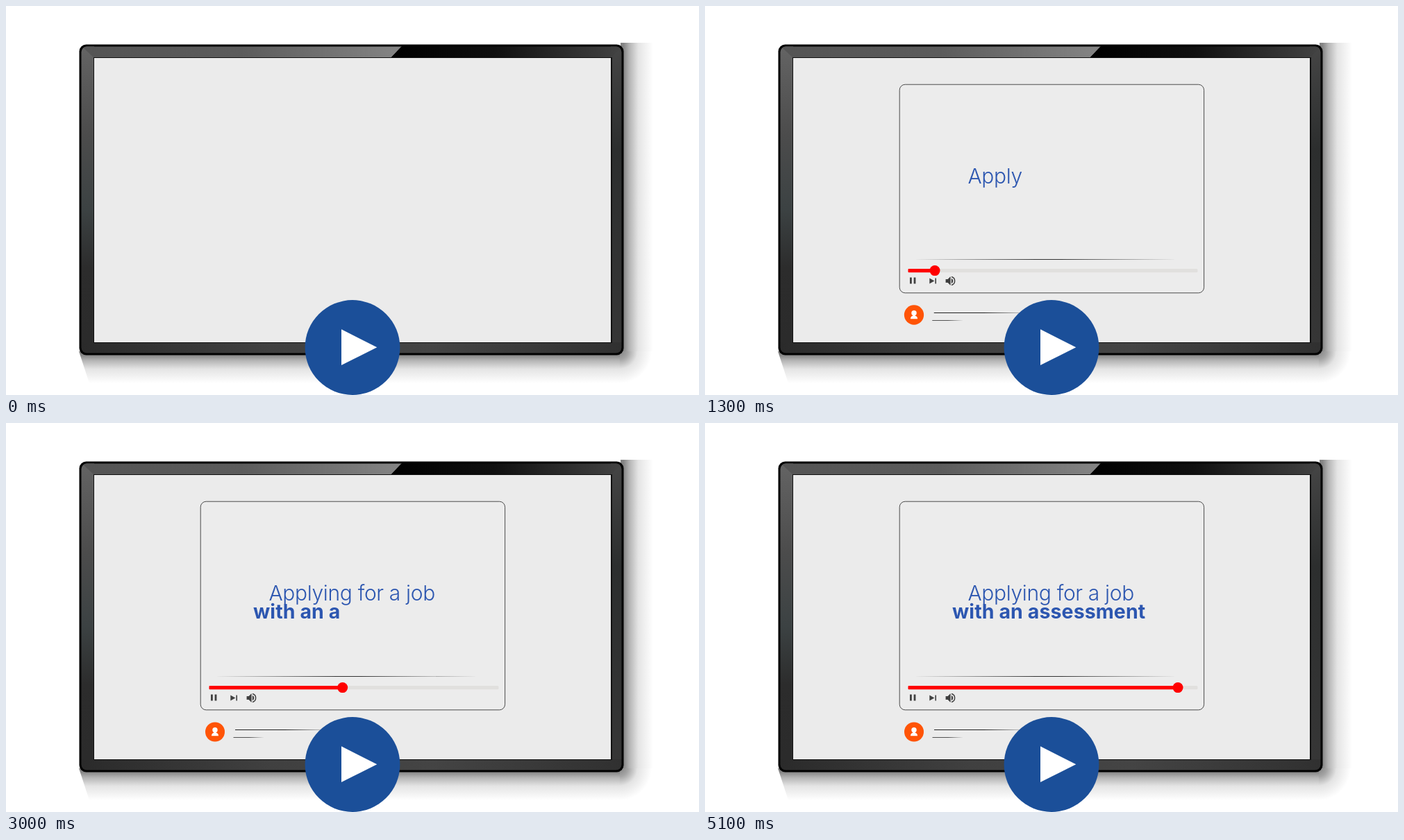
These frames come from a looping animation (998x561 px, 5200 ms). An HTML page:

```html
<!DOCTYPE html>
<html lang="en">
<head>
<meta charset="utf-8">
<title>Video player</title>
<style>
  html, body { margin: 0; width: 100%; height: 100%; overflow: hidden; background: #fff; }
  svg { display: block; width: 100%; height: 100%; }
  text { font-family: Inter, "Open Sans", sans-serif; fill: #2c56b0; white-space: pre; }
</style>
</head>
<body>
<svg viewBox="0 0 998 561">
  <defs>
    <linearGradient id="shadeR" gradientUnits="userSpaceOnUse" x1="889" x2="932" y1="0" y2="0">
      <stop offset="0" stop-color="#838383"/><stop offset=".2" stop-color="#b4b4b4"/>
      <stop offset=".5" stop-color="#e4e4e4"/><stop offset="1" stop-color="#fff"/>
    </linearGradient>
    <linearGradient id="shadeB" gradientUnits="userSpaceOnUse" x1="0" x2="0" y1="503" y2="544">
      <stop offset="0" stop-color="#838383"/><stop offset=".2" stop-color="#b4b4b4"/>
      <stop offset=".5" stop-color="#e4e4e4"/><stop offset="1" stop-color="#fff"/>
    </linearGradient>
    <radialGradient id="shadeC" gradientUnits="userSpaceOnUse" cx="884" cy="498" r="46">
      <stop offset="0" stop-color="#838383"/><stop offset=".25" stop-color="#a4a4a4"/>
      <stop offset=".55" stop-color="#e4e4e4"/><stop offset="1" stop-color="#fff"/>
    </radialGradient>
    <linearGradient id="topL">
      <stop offset="0" stop-color="#545454"/><stop offset=".5" stop-color="#5c5c5c"/><stop offset="1" stop-color="#858585"/>
    </linearGradient>
    <linearGradient id="topR">
      <stop offset="0" stop-color="#000"/><stop offset=".45" stop-color="#101010"/><stop offset="1" stop-color="#444"/>
    </linearGradient>
    <linearGradient id="sideL" x2="0" y2="1">
      <stop offset="0" stop-color="#646464"/><stop offset=".3" stop-color="#4c4c4c"/>
      <stop offset=".55" stop-color="#3c4243"/><stop offset=".75" stop-color="#2c2c2c"/><stop offset="1" stop-color="#2b2b2b"/>
    </linearGradient>
    <linearGradient id="sideR" x2="0" y2="1">
      <stop offset="0" stop-color="#454545"/><stop offset=".35" stop-color="#2c2e2e"/><stop offset="1" stop-color="#363636"/>
    </linearGradient>
    <linearGradient id="foot">
      <stop offset="0" stop-color="#2a2a2a"/><stop offset=".35" stop-color="#404040"/>
      <stop offset=".65" stop-color="#444"/><stop offset="1" stop-color="#303030"/>
    </linearGradient>
    <clipPath id="bezel"><rect x="108.5" y="58.5" width="778" height="442" rx="8"/></clipPath>
  </defs>

  <path d="M885 53H932V498H885Z" fill="url(#shadeR)"/>
  <path d="M105 498L120 544H884V498Z" fill="url(#shadeB)"/>
  <path d="M884 498H932V544H884Z" fill="url(#shadeC)"/>

  <rect x="105.5" y="55.5" width="784" height="448" rx="10"/>
  <g clip-path="url(#bezel)">
    <rect x="106" y="485" width="783" height="18" fill="url(#foot)"/>
    <rect x="106" y="57" width="21" height="428" fill="url(#sideL)"/>
    <rect x="871" y="57" width="18" height="428" fill="url(#sideR)"/>
    <path d="M108 57H571L554 75H127Z" fill="url(#topL)"/>
    <path d="M571 57H889L871 75H554Z" fill="url(#topR)"/>
  </g>
  <rect x="126" y="74" width="747" height="412" fill="#111"/>
  <rect x="127" y="75" width="744" height="410" fill="#ebebeb"/>

  <g id="player">
    <rect x="280.2" y="113.2" width="438.4" height="300.6" rx="8" fill="#ececec" stroke="#3a3a3a" stroke-width=".9"/>
    <path d="M300 365.4L480 365L680 365.4L480 366Z" fill="#333"/>
    <rect x="292.5" y="379" width="417" height="5.2" rx="1.5" fill="#e1e0de"/>
  </g>

  <g id="icons" fill="#404040">
    <path d="M295 391.5h2.8v9h-2.8zM300.6 391.5h2.8v9h-2.8z"/>
    <path d="M323.3 392.6L330.4 396.5L323.3 400.4ZM331.4 392.4h1.6v8.2h-1.6z"/>
    <path d="M346.6 394h3l4-4v13l-4-4h-3z"/>
    <path d="M354.8 392.8a4 4 0 0 1 0 7.4z"/>
    <path d="M355 390.5a6.2 6.2 0 0 1 0 12" fill="none" stroke="#404040" stroke-width="1.5"/>
  </g>

  <g id="played" fill="#f00">
    <rect id="bar" x="292.5" y="379" height="5.2" rx="1"/>
    <circle id="knob" cy="381.6" r="7.5"/>
  </g>

  <g id="notes" fill="#222">
    <path d="M330 442.1H400L470 442.5L400 443H330Z"/>
    <path d="M327.5 453.2H350L372 453.6L350 454H327.5Z"/>
  </g>

  <g id="avatar">
    <circle cx="301" cy="445.5" r="14" fill="#ff5406"/>
    <circle cx="301" cy="442.8" r="3.7" fill="#fff"/>
    <path d="M299.4 445h3.2v1.8q3.4.8 3.4 4.4h-10q0-3.6 3.4-4.4z" fill="#fff"/>
  </g>

  <text id="line1" x="378.5" y="256" font-size="30" font-weight="300" letter-spacing="-.35"></text>
  <text id="line2" x="356" y="281.5" font-size="28.5" font-weight="700" letter-spacing=".1"></text>

  <circle cx="499" cy="492.5" r="68.4" fill="#1b4f99"/>
  <path d="M483 466.3V518L534.3 492.2Z" fill="#fff"/>
</svg>
<script>
  const LOOP = 5200, STEP = 100, TYPE_MS = 83.3;
  const $ = id => document.getElementById(id);

  // Spring-like scale: [ms since start, scale]
  const POP = [[0, 0], [50, .45], [150, .95], [250, 1.075], [350, 1.045],
               [450, 1.02], [550, 1.011], [750, 1.009], [1200, 1]];

  function popScale(ms) {
    if (ms <= 0) return 0;
    for (let i = 1; i < POP.length; i++) {
      const [t0, a] = POP[i - 1], [t1, b] = POP[i];
      if (ms < t1) return a + (b - a) * (ms - t0) / (t1 - t0);
    }
    return 1;
  }

  function pop(id, ms, cx, cy, turn = 0) {
    const s = popScale(ms);
    $(id).setAttribute("transform",
      `translate(${cx} ${cy}) rotate(${turn * (s - 1)}) scale(${s}) translate(${-cx} ${-cy})`);
    $(id).style.display = s ? "" : "none";
  }

  function type(id, words, ms) {
    $(id).textContent = words.slice(0, Math.max(0, Math.floor(ms / TYPE_MS)));
  }

  function draw(t) {
    pop("player", t - 50, 499.5, 263.5, 47);
    pop("icons", t - 50, 326, 510);
    pop("notes", t - 300, 390, 448);
    pop("avatar", t - 550, 301, 445.5);

    const d = t - 1300;
    const x = 331 + .089 * d + 8.2e-7 * d * d;
    $("played").style.display = t < 900 ? "none" : "";
    $("bar").setAttribute("width", Math.max(0, x - 292.5));
    $("knob").setAttribute("cx", x);

    type("line1", "Applying for a job", t - 860);
    type("line2", "with an assessment", t - 2230);
  }

  const start = performance.now();
  function tick() {
    const t = (performance.now() - start) % LOOP;
    draw(Math.floor(t / STEP) * STEP);
    requestAnimationFrame(tick);
  }
  tick();
</script>
</body>
</html>
```
